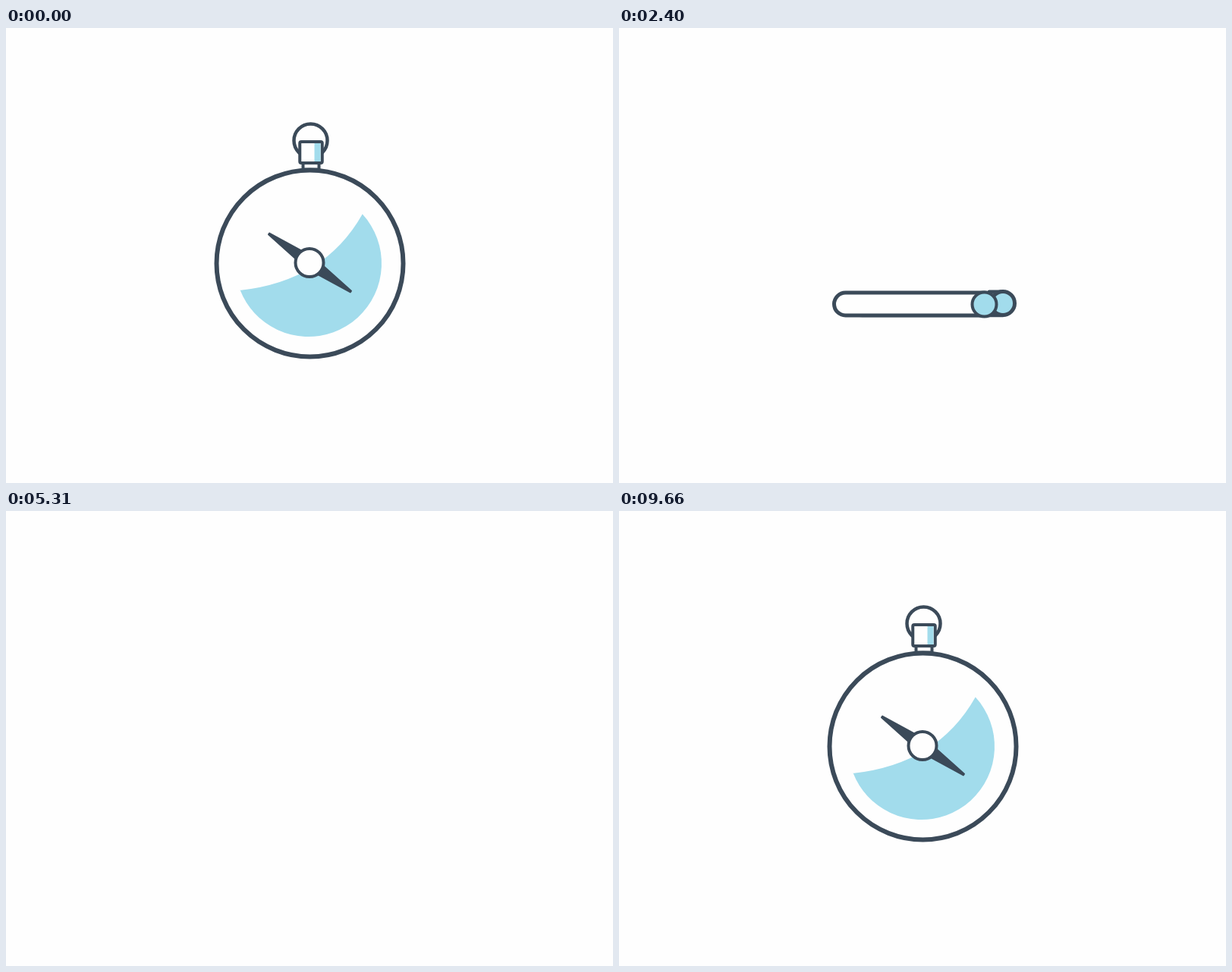
Write an HTML page with a canvas that moves like this. It is 800x600 px and loops after 9690 ms.

```html
<!DOCTYPE html>
<html lang="en">
<head>
<meta charset="utf-8">
<title>Compass and scroll</title>
<style>
  html, body { margin: 0; width: 100%; height: 100%; overflow: hidden; background: #fefefe; }
  canvas { display: block; width: 800px; height: 600px; }
</style>
</head>
<body>
<canvas id="stage" width="800" height="600"></canvas>
<script>
const ctx = document.getElementById('stage').getContext('2d');
const LOOP = 9690, INK = '#3b4a59', BLUE = '#a2dcec', PAPER = '#fefefe';
const TAU = Math.PI * 2, DEG = Math.PI / 180;

const clamp = v => Math.max(0, Math.min(1, v));
const span = (t, a, b) => clamp((t - a) / (b - a));
const mix = (a, b, p) => a + (b - a) * p;
const inOut = p => (1 - Math.cos(p * Math.PI)) / 2;
const easeOut = p => 1 - (1 - p) * (1 - p);
const backOut = (p, s = 1.7) => 1 + (s + 1) * (p - 1) ** 3 + s * (p - 1) ** 2;

function paint(fill, width) {
  if (fill) { ctx.fillStyle = fill; ctx.fill(); }
  if (width) { ctx.lineWidth = width; ctx.strokeStyle = INK; ctx.stroke(); }
}

function disc(x, y, r, fill, width) {
  if (r <= 0) return;
  ctx.beginPath();
  ctx.arc(x, y, r, 0, TAU);
  paint(fill, width);
}

function box(x, y, w, h, r, fill, width) {
  ctx.beginPath();
  ctx.roundRect(x, y, w, h, r);
  paint(fill, width);
}

function line(x1, y1, x2, y2, width) {
  ctx.beginPath();
  ctx.moveTo(x1, y1);
  ctx.lineTo(x2, y2);
  paint(null, width);
}

// Runs draw() scaled and turned around a point.
function around(x, y, scale, angle, draw) {
  if (scale <= 0) return;
  ctx.save();
  ctx.translate(x, y);
  ctx.rotate(angle * DEG);
  ctx.scale(scale, scale);
  ctx.translate(-x, -y);
  draw();
  ctx.restore();
}

function wedge() {
  const cx = 398.5, cy = 310.5;
  ctx.beginPath();
  ctx.moveTo(308, 346);
  ctx.quadraticCurveTo(420, 334, 470, 245);
  ctx.arc(cx, cy, 96.5, Math.atan2(245 - cy, 470 - cx), Math.atan2(346 - cy, 308 - cx));
  ctx.closePath();
  paint(BLUE);
}

function needle(angle, scale) {
  around(400.5, 309.5, scale, angle, () => {
    for (const side of [-1, 1]) {
      ctx.beginPath();
      ctx.moveTo(400.5 + side * 14, 302.5);
      ctx.lineTo(400.5 + side * 66, 308.5);
      ctx.lineTo(400.5 + side * 66, 310.5);
      ctx.lineTo(400.5 + side * 14, 316.5);
      ctx.closePath();
      paint(INK, 2);
    }
  });
  around(400, 309.5, scale, 0, () => disc(400, 309.5, 18.5, PAPER, 4));
}

const loopRing = scale => around(401.5, 148.5, scale, 0, () => disc(401.5, 148.5, 22, null, 4.5));
const ring = r => disc(400.5, 310.5, r, null, 6 * Math.min(1, r / 60));

function neck(x, y, angle, scale) {
  around(x, y, scale, angle, () => box(x - 10.5, y - 4.5, 21, 9, 1, PAPER, 4));
}

function cap(x, y, w, h, angle, width, stripe) {
  around(x, y, 1, angle, () => {
    box(x - w / 2, y - h / 2, w, h, Math.min(2, w / 4), PAPER, width);
    if (stripe > 0) {
      ctx.fillStyle = BLUE;
      ctx.fillRect(406.5, 176 - 24 * stripe, 8, 24 * stripe);
    }
  });
}

function collapse(t) {
  const part = (a, b) => 1 - inOut(span(t, a, b));
  const knob = part(20, 420);
  loopRing(knob);
  neck(402, 182, 0, knob);
  around(402, 164, knob, 0, () => cap(402, 164, 29.5, 28, 0, 4, 1));
  around(398.5, 310.5, part(120, 800), 0, wedge);
  needle(35.2 + 60 * inOut(span(t, 20, 700)), part(120, 750));
  const grow = mix(123, 144.5, inOut(span(t, 30, 600)));
  ring(mix(grow, 18, span(t, 600, 1080) ** 1.6));
}

function rollingBall(t) {
  if (t < 1080) return;
  const back = inOut(span(t, 1424, 1960));
  const x = mix(mix(400, 147, inOut(span(t, 1000, 1424))), 298, back);
  disc(x, mix(311.5, 364, back), mix(19.7, 16, back), BLUE, mix(2.5, 4, back));
}

function picture() {
  box(332.5, 313.5, 128.5, 53, 2, PAPER, 0);
  ctx.beginPath();
  ctx.moveTo(366, 365);
  ctx.lineTo(460, 328);
  ctx.lineTo(460, 365);
  paint(BLUE);
  box(332.5, 313.5, 128.5, 53, 2, null, 4);
}

function scroll(t) {
  const p = backOut(span(t, 2600, 3300), 0.6);
  const pull = inOut(span(t, 1960, 2270));
  const slide = inOut(span(t, 2250, 2380));
  const top = mix(364, 210, p), low = mix(363, 388, p);
  const endX = mix(298, 481, pull);
  const lowX = mix(mix(481, 506, slide), 511, p);
  const base = low + 15.5;

  if (slide > 0) {
    line(488, low - 15, lowX, low - 15, 5);
    ctx.beginPath();
    ctx.moveTo(304, top);
    ctx.lineTo(304, base - 17);
    ctx.quadraticCurveTo(304, base, 321, base);
    ctx.lineTo(lowX, base);
    paint(null, 5.5);
    if (p > 0) line(496, top, 496, low, 5.5);
    disc(lowX, low, 15.5, BLUE, 5);
  }

  if (t > 2850) around(396.7, 340, easeOut(span(t, 2850, 3150)), 0, picture);
  if (t > 2889) {
    const length = 150 * easeOut(span(t, 2889, 4718)) + 0.5;
    line(401, 264, 401 + Math.min(length - 4, 59), 264, 4);
    line(333.5, 285, 333.5 + Math.min(length - 3, 126.5), 285, 4);
  }

  box(283.5, top - 15, endX - 298 + 30, 30, 15, PAPER, 5);
  disc(endX + 0.5, top + 0.5, 16, BLUE, 4);
}

function orbit(t) {
  if (t < 5320 || t > 6860) return;
  const turn = Math.PI * ((t - 5320) / 950) ** 2;
  const inward = inOut(span(t, 6660, 6860));
  const r = 19 * easeOut(span(t, 5320, 5440)) * (1 - inward);
  const x = 394 + 190 * Math.cos(turn) * (1 - inward) + 6.5 * inward;
  disc(x, 310 + 172 * Math.sin(turn) * (1 - inward), r, BLUE, 2.5 * Math.min(1, r / 8));
}

function needleAngle(t) {
  if (t < 8600) return mix(55, 26, inOut(span(t, 8280, 8600)));
  if (t < 9210) return mix(26, 88, inOut(span(t, 8600, 9210)));
  return mix(88, 35.2, inOut(span(t, 9210, 9660)));
}

function build(t) {
  orbit(t);
  if (t > 7300) loopRing(backOut(span(t, 7300, 7700), 1));
  if (t > 7500) around(398.5, 310.5, easeOut(span(t, 7500, 8400)), 0, wedge);
  if (t > 6870) {
    const p = span(t, 6870, 7170);
    neck(mix(405, 402, p), mix(150, 182, p), -31 * (1 - p), span(t, 6870, 6930));
  }
  if (t > 6900) {
    const p = span(t, 6900, 7250);
    cap(mix(404, 402, p), mix(137, 164, p), mix(0.5, 29.5, p), mix(6, 28, p),
      -16 * (1 - p), mix(1.4, 4, p), inOut(span(t, 8250, 8600)));
  }
  if (t > 6680) ring(123 * backOut(span(t, 6680, 6930), 0));
  if (t > 8270) needle(needleAngle(t), easeOut(span(t, 8270, 8560)));
}

let start = null;
function frame(now) {
  if (start === null) start = now;
  const t = (now - start) % LOOP;
  ctx.fillStyle = PAPER;
  ctx.fillRect(0, 0, 800, 600);
  ctx.lineCap = 'round';
  ctx.lineJoin = 'round';
  if (t < 1080) collapse(t);
  else if (t < 1960) rollingBall(t);
  else if (t < 5310) scroll(t);
  else build(t);
  requestAnimationFrame(frame);
}
requestAnimationFrame(frame);
</script>
</body>
</html>
```
